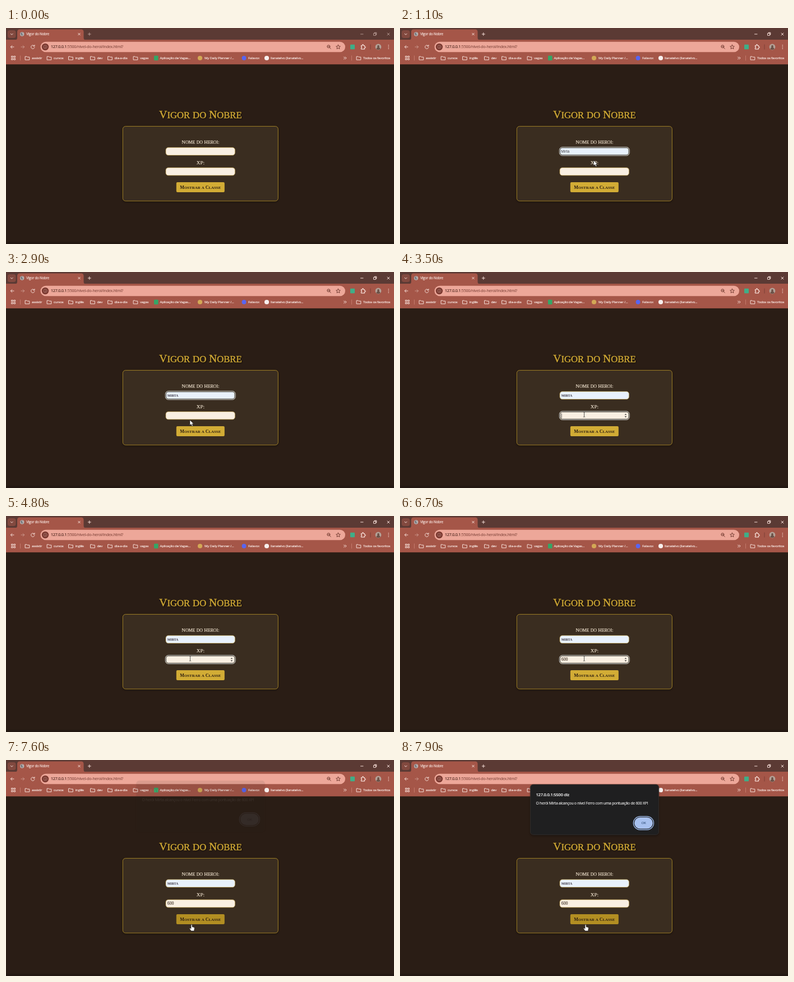
Animation, 692 px wide and 388 px high, one loop 8 s. Source, as an HTML page:

```html
<!DOCTYPE html>
<html lang="pt-BR">
<head>
<meta charset="utf-8">
<title>Vigor do Nobre</title>
<style>
html, body { margin: 0; width: 100%; height: 100%; overflow: hidden; background: #2a1d15; }
svg { display: block; width: 692px; height: 388px; }
text { font-family: "Open Sans", "Noto Sans", sans-serif; letter-spacing: -.035em; stroke-width: .16; white-space: pre; }
.serif { font-family: "Liberation Serif", "Noto Serif", serif; letter-spacing: 0; stroke-width: .022em; }
.sans { font-family: "Liberation Sans", Arial, sans-serif; letter-spacing: 0; }
.line { fill: none; stroke: #f6ded7; stroke-linecap: round; stroke-linejoin: round; }
.dark { stroke: #753d33; }
</style>
</head>
<body>
<svg id="stage" viewBox="0 0 692 388" xmlns="http://www.w3.org/2000/svg">
  <defs>
    <filter id="shadow" x="-10%" y="-20%" width="120%" height="150%" color-interpolation-filters="sRGB">
      <feDropShadow dx="0" dy="1.5" stdDeviation="1.8" flood-color="#000" flood-opacity=".4"/>
    </filter>
    <filter id="textShadow" x="-5%" y="-20%" width="110%" height="150%" color-interpolation-filters="sRGB">
      <feDropShadow dx="1" dy="1" stdDeviation=".8" flood-color="#000" flood-opacity=".6"/>
    </filter>
  </defs>

  <!-- Page -->
  <rect width="692" height="388" fill="#2a1d15"/>
  <rect y="384" width="692" height="4" fill="#231812"/>
  <g id="page">
    <rect x="208.3" y="176.6" width="277" height="134.2" rx="5" fill="#3a2d20" stroke="#a18127" filter="url(#shadow)"/>
    <rect id="nameField" x="285" y="214.7" width="123.4" height="13.8" rx="4.5" stroke="#c0a04a" stroke-width=".7"/>
    <rect id="xpField" x="285" y="250.9" width="123.4" height="13.9" rx="4.5" fill="#f9efe2" stroke="#c0a04a" stroke-width=".7"/>
    <g id="ring" fill="none">
      <rect x="284.3" y="214" width="124.8" height="15.2" rx="5.2" stroke="#d5d8dc"/>
      <rect x="285.4" y="215.1" width="122.6" height="13" rx="4.2" stroke="#2a2a2c" stroke-width=".9"/>
    </g>
    <path id="spinner" fill="#4c4a48" d="M400.6 256.8l1.8-2.4 1.8 2.4zM400.6 259l1.8 2.4 1.8-2.4z"/>
    <rect id="caret" width=".8" height="8.5" fill="#222"/>
    <rect id="button" x="303.8" y="277" width="86" height="18" rx="2"/>
  </g>

  <!-- Browser -->
  <g id="chrome">
    <rect width="692" height="22" fill="#5b3a34"/>
    <rect y="21" width="692" height="44.3" fill="#a55648"/>
    <path d="M16 21.500q4 0 4-4V7q0-4.500 4.500-4.500H134q4.500 0 4.500 4.500v10.500q0 4 4 4z" fill="#a55648"/>
    <rect x="3" y="4" width="14.500" height="14" rx="4" fill="#82493f"/>
    <path class="line" d="M8.300 10.200l2 2 2-2M128.700 9.200l3.600 3.600m0-3.600l-3.600 3.600"/>
    <circle cx="28.700" cy="11" r="3.700" fill="#b9b2b1"/>
    <path d="M26 9.500q2-2 3.500-1l-1 2 2 1.500-2 2q-2-1-2.500-4.500z" fill="#74787d"/>
    <path id="plus" class="line" d="M146.300 11h5m-2.500-2.500v5"/>
    <path id="windowIcons" class="line" d="M632.500 11h4.500M656 9.500h3.500v3.800H656zM657.200 9.300V8.200h3.600v3.800h-1.200M680 9l4 4m0-4l-4 4"/>
    <path class="line" d="M14 34H8.500m2.400-2.500L8.400 34l2.500 2.500"/>
    <path class="line" opacity=".45" d="M27 34h5.500m-2.400-2.500l2.500 2.500-2.500 2.500"/>
    <path class="line" d="M50.500 32.300a3.200 3.200 0 1 0 .5 2.400M51 30.500v2.200h-2.300"/>
    <rect x="61.500" y="24.700" width="543.500" height="18.600" rx="9.300" fill="#eda799"/>
    <circle cx="70" cy="34" r="6.200" fill="#7b382f"/>
    <g opacity=".45"><path class="line" d="M70 33.600v2M70 31.800v.1"/><circle class="line" cx="70" cy="33.900" r="3.200" stroke-width=".7"/></g>
    <circle class="line dark" cx="575.300" cy="33.200" r="2.500"/>
    <path class="line dark" d="M577.200 35.200l2.100 2.100M574 33.200h2.600M592.500 30.200l1.100 2.500 2.700.3-2 1.800.6 2.700-2.400-1.400-2.400 1.400.6-2.700-2-1.800 2.700-.3z"/>
    <rect x="614" y="29.800" width="8" height="8.500" rx="1" fill="#3fae87"/>
    <path class="line" stroke-width="1.200" d="M633.500 31.500h2v-.8a1 1 0 0 1 2 0v.8h2v2h.7a1 1 0 0 1 0 2h-.7v2.300h-6v-2.200a1.100 1.100 0 0 0 0-2.200z"/>
    <path d="M650 29.500v9" stroke="#7d4036"/>
    <circle cx="664" cy="34" r="5.400" fill="#b3a197"/>
    <path d="M660.500 38q0-2.500 2-3-1-4 1.500-4.300 2.600.3 1.500 4.300 2 .5 2 3-3.500 2-7 0z" fill="#6b5046"/>
    <g fill="#f6ded7"><circle cx="682.300" cy="31" r=".8"/><circle cx="682.300" cy="34" r=".8"/><circle cx="682.300" cy="37" r=".8"/></g>
    <path class="line" d="M10 50.500h2.300v2.300H10zM14.300 50.500h2.300v2.300h-2.300zM10 54.800h2.300v2.300H10zM14.300 54.800h2.300v2.300h-2.300z"/>
    <path d="M25.500 49.500v9M616.500 49.500v9" stroke="#d08a7d" stroke-width=".7"/>
    <path class="line" d="M602.500 52l2 2-2 2m2.600-4l2 2-2 2"/>
    <rect x="264" y="49.700" width="7.500" height="8.500" rx="1" fill="#35a666"/>
    <circle cx="346" cy="54" r="4.100" fill="#d3a855"/>
    <circle cx="424.500" cy="54" r="3.900" fill="#5865f2"/>
    <circle cx="465" cy="54" r="4.100" fill="#f7efed"/>
  </g>

  <!-- Alert -->
  <g id="dialog">
    <rect x="232.500" y="44" width="229" height="90.300" rx="5" fill="#1f1f20" stroke="#3b3633" stroke-width=".7" filter="url(#shadow)"/>
    <rect x="416.300" y="101.300" width="36.200" height="24" rx="12" fill="#1f1f20" stroke="#a8c7fa" stroke-width="1.200"/>
    <rect x="418" y="103" width="32.800" height="20.600" rx="10.300" fill="#a8c1ee"/>
  </g>

  <path id="arrow" d="M0 0v9.300l2.100-2 1.600 3.500 1.700-.8-1.600-3.300h2.900z" fill="#fff" stroke="#222" stroke-width=".6"/>
  <path id="beam" d="M-1.600-4.500Q0-4.500 0-3.500V3.500Q0 4.500-1.600 4.500M1.600-4.500Q0-4.500 0-3.500M0 3.500Q0 4.500 1.600 4.500" fill="none" stroke="#333" stroke-width=".8"/>
  <path id="hand" d="M-1 .8Q0-.6 1 .8V4.200l3.200.7q1.200.4 1 1.800L4.500 11.500H-.8L-3.500 7.700q-.3-1.400 1-1.200L-1 7.500z" fill="#fff" stroke="#222" stroke-width=".6"/>
</svg>
<script>
const LOOP = 8000, STEP = 100;
const HERO = "Mirta";
const $ = id => document.getElementById(id);

function add(parent, tag, attrs, content = "") {
  const node = document.createElementNS("http://www.w3.org/2000/svg", tag);
  for (const key in attrs) node.setAttribute(key, attrs[key]);
  node.textContent = content;
  parent.append(node);
  return node;
}

// A thin stroke in the text colour gives the slightly heavy screen type.
const label = (parent, x, y, size, fill, content, extra = {}) =>
  add($(parent), "text", { x, y, "font-size": size, fill, stroke: fill, ...extra }, content);

// Lowercase letters become slightly smaller capitals.
function smallCaps(x, y, size, fill, content, extra = {}) {
  const node = label("page", x, y, size, fill, "", { class: "serif", ...extra });
  for (const part of content.match(/\p{Ll}+|[^\p{Ll}]+/gu)) {
    const small = /\p{Ll}/u.test(part);
    add(node, "tspan", { "font-size": small ? size * .85 : size }, part.toUpperCase());
  }
  return node;
}

const middle = { "text-anchor": "middle" }, bold = { "font-weight": 700, stroke: "none" };
smallCaps(347, 161.5, 19.6, "#d0a935", "Vigor do Nobre", { ...middle, filter: "url(#textShadow)" });
smallCaps(347, 208.2, 9.2, "#e9dcc8", "Nome do Heroi:", middle);
smallCaps(347, 244.8, 9.2, "#e9dcc8", "XP:", middle);
smallCaps(346.8, 288.8, 8.1, "#2c1d12", "Mostrar a Classe", { ...middle, ...bold });
const preview = label("page", 287.3, 224, 6.7, "#444", HERO, { class: "sans", stroke: "none" });
const heroName = smallCaps(287.8, 224, 6.5, "#3a3540", HERO, bold);
const xpText = smallCaps(287.8, 260.2, 7.8, "#4a3c30", " ");

const pale = "#f8e8e3";
label("chrome", 36.3, 13.2, 6.2, pale, "Vigor do Nobre");
const url = label("chrome", 80, 36.4, 7.2, "#4d261f", "127.0.0.1");
add(url, "tspan", { fill: "#8c5046", stroke: "#8c5046" }, ":5500/nivel-do-heroi/index.html?");

const bookmarks = [
  [46, "assistir", 1], [85, "cursos", 1], [123.5, "inglês", 1], [162.5, "dev", 1],
  [193.5, "dia-a-dia", 1], [239, "vagas", 1], [274.5, "Aplicação de Vagas..."],
  [354, "My Daily Planner /..."], [432, "Falavox"], [472, "lianatelvo (lianatelvo..."],
  [637, "Todos os favoritos", 1]
];
for (const [x, name, folder] of bookmarks) {
  label("chrome", x, 56.2, 6.15, pale, name);
  if (folder) add($("chrome"), "path", { class: "line", d: `M${x - 11.5} 51.2h2.500l1 1h3.800v5h-7.300z` });
}

label("dialog", 242.5, 64.8, 7.6, "#e8e8e8", "127.0.0.1:5500 diz", { "font-weight": 600 });
label("dialog", 242.5, 80.3, 6.8, "#e8e8e8", `O herói ${HERO} alcançou o nível Ferro com uma pontuação de 600 XP!`);
label("dialog", 434.4, 115.4, 6, "#3a5680", "OK", middle);

// time, x, y, pointer shape from that time on
const pointerKeys = [
  [100, 520, 120, "arrow"], [400, 346, 222, "beam"], [800, 346, 222, "beam"],
  [1000, 345.5, 238, "arrow"], [2300, 345.5, 238, "arrow"], [2800, 328, 266, "arrow"],
  [2900, 328, 266, "arrow"], [3100, 328.5, 256, "beam"], [6700, 328.5, 256, "beam"],
  [6900, 330, 281, "hand"], [7200, 331, 295.5, "hand"], [LOOP, 331, 295.5, "hand"]
];

const clamp = v => Math.max(0, Math.min(1, v));
const progress = (t, from, to) => clamp((t - from) / (to - from));
const ease = p => p * p * (3 - 2 * p);
const show = (node, on) => node.setAttribute("visibility", on ? "visible" : "hidden");

function drawPointer(t) {
  const i = pointerKeys.findLastIndex(key => key[0] <= t);
  for (const shape of ["arrow", "beam", "hand"]) show($(shape), i >= 0 && pointerKeys[i][3] === shape);
  if (i < 0) return;
  const [t0, x0, y0, shape] = pointerKeys[i];
  const [t1, x1, y1] = pointerKeys[i + 1];
  const p = ease(progress(t, t0, t1));
  $(shape).setAttribute("transform", `translate(${x0 + (x1 - x0) * p} ${y0 + (y1 - y0) * p})`);
}

function drawForm(t) {
  const filled = t >= 1000, accepted = t >= 2000;
  const onXp = t >= 3300, blurred = t >= 7500;
  $("nameField").setAttribute("fill", filled ? "#e8f1fc" : "#f9efe2");
  show(preview, filled && !accepted);
  show(heroName, accepted);

  show($("ring"), t >= 400 && !blurred);
  $("ring").setAttribute("transform", `translate(0 ${onXp ? 36.2 : 0})`);
  show($("spinner"), t >= 3200 && !blurred);

  const typed = t < 5900 ? "" : t < 6200 ? "6" : "600";
  xpText.firstChild.textContent = typed;
  const blink = [[600, 1000], [3300, 3800], [4300, 4800], [5400, 6700], [7200, 7500]];
  show($("caret"), blink.some(([on, off]) => t >= on && t < off));
  $("caret").setAttribute("x", 287.6 + typed.length * 4);
  $("caret").setAttribute("y", onXp ? 254 : 217.8);

  const hover = progress(t, 6800, 7200);
  const mix = (a, b) => Math.round(a + (b - a) * hover);
  $("button").setAttribute("fill", `rgb(${mix(210, 178)},${mix(172, 142)},${mix(53, 34)})`);
}

function draw(t) {
  drawForm(t);
  drawPointer(t);
  const active = t < 1000 ? .55 : 1;
  $("windowIcons").setAttribute("opacity", active);
  $("plus").setAttribute("opacity", active);
  const p = progress(t, 7500, 7800);
  $("dialog").setAttribute("opacity", p < .5 ? p * .25 : p);
  $("dialog").setAttribute("transform", `translate(0 ${-9 * (1 - ease(p))})`);
}

const start = performance.now();
function tick() {
  const t = (performance.now() - start) % LOOP;
  draw(Math.floor(t / STEP) * STEP);
  requestAnimationFrame(tick);
}
tick();
</script>
</body>
</html>
```
